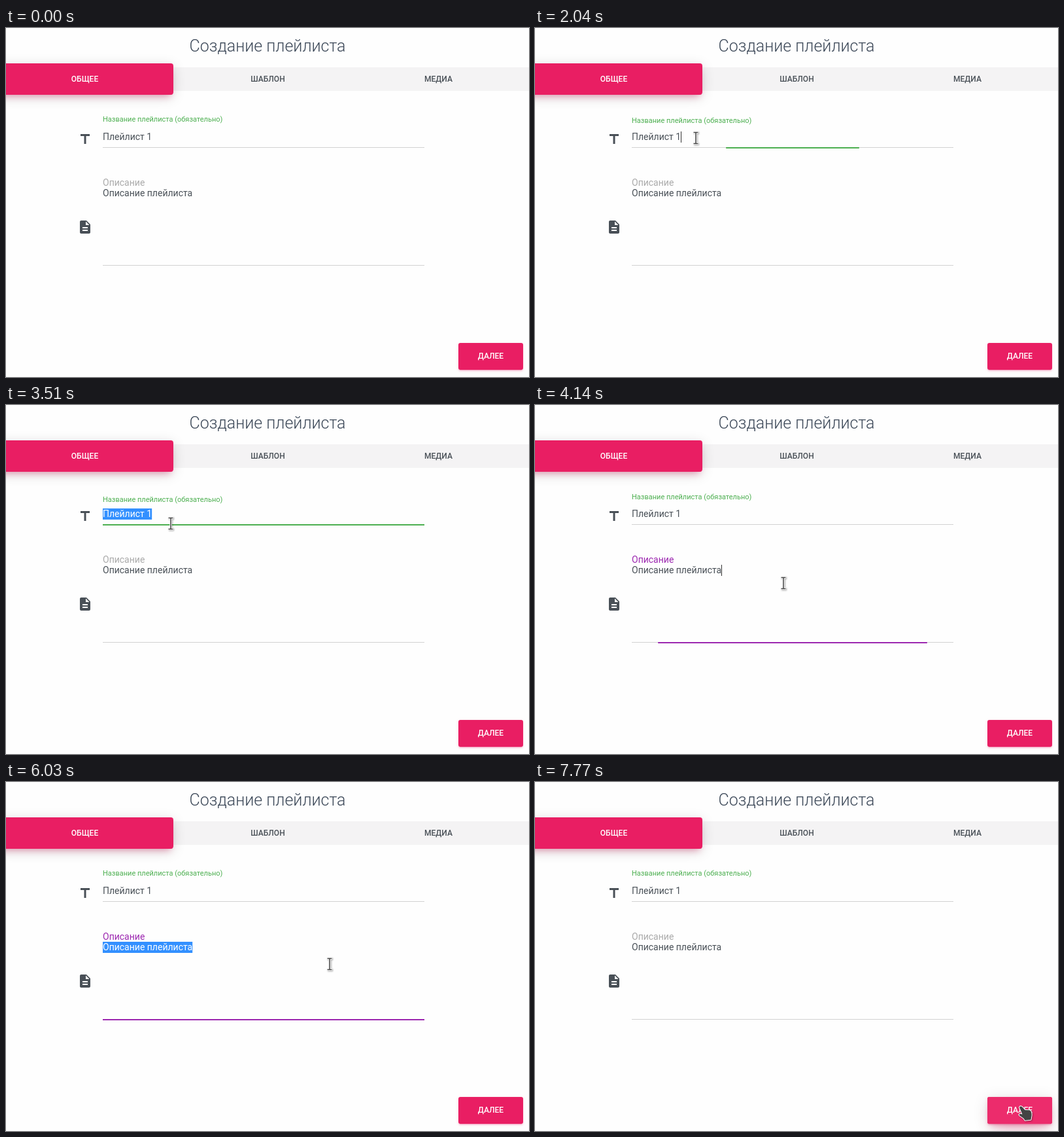
These frames come from a looping animation (800 px wide and 533 px high, 8000 ms). An HTML page:

```html
<!DOCTYPE html>
<html lang="ru">
<head>
<meta charset="utf-8">
<title>Создание плейлиста</title>
<style>
  html, body { margin: 0; width: 100%; height: 100%; overflow: hidden; background: #fefefe; }
  #stage { position: relative; width: 800px; height: 533px; overflow: hidden; }
  #stage > * { position: absolute; }
  .bar { left: 0; top: 60px; width: 800px; height: 36px; background: #f4f3f4; }
  .tab { left: -15px; top: 54px; width: 271px; height: 48px; border-radius: 4px; background: #e91e63;
    box-shadow: 0 4px 20px rgba(0,0,0,.14), 0 7px 10px -5px rgba(233,30,99,.4); }
  .button { left: 692px; top: 481px; width: 99px; height: 41px; border-radius: 3px; background: #e91e63;
    box-shadow: 0 2px 2px rgba(233,30,99,.14), 0 3px 1px -2px rgba(233,30,99,.2), 0 1px 5px rgba(233,30,99,.12); }
  #hover { background: #ec2c6c; opacity: 0;
    box-shadow: 0 14px 26px -12px rgba(233,30,99,.42), 0 4px 23px rgba(0,0,0,.12), 0 8px 10px -5px rgba(233,30,99,.2); }
  svg { left: 0; top: 0; font: 14px Roboto, sans-serif; fill: #495057; }
  .title { font-size: 25px; font-weight: 300; fill: #3c4858; }
  .caps { font-size: 12px; font-weight: 500; }
  .mid { text-anchor: middle; }
  .white { fill: #fff; }
  .line { fill: #d2d2d2; }
  .pointer { fill: #444; stroke: #fff; stroke-width: 2; stroke-linejoin: round; paint-order: stroke; }
  #cursor { filter: drop-shadow(1px 1px 1px rgba(0,0,0,.35)); }
</style>
</head>
<body>
<div id="stage">
  <div class="bar"></div>
  <div class="tab"></div>
  <div class="button"></div>
  <div class="button" id="hover"></div>
  <svg width="800" height="533">
    <text class="title mid" x="400" y="36">Создание плейлиста</text>
    <g class="caps mid">
      <text class="white" x="120.5" y="82">ОБЩЕЕ</text>
      <text x="400.5" y="82">ШАБЛОН</text>
      <text x="661.5" y="82">МЕДИА</text>
      <text class="white" x="741.5" y="505">ДАЛЕЕ</text>
    </g>
    <path transform="translate(109 158)" d="M5 4v3h5.5v12h3V7H19V4z"/>
    <path transform="translate(109 292)" d="M14 2H6c-1.1 0-2 .9-2 2v16c0 1.1.9 2 2 2h12c1.1 0 2-.9 2-2V8l-6-6zm2 16H8v-2h8v2zm0-4H8v-2h8v2zm-3-5V3.5L18.5 9H13z"/>
    <text id="nameLabel" x="148" y="143" font-size="11" fill="#4caf50">Название плейлиста (обязательно)</text>
    <text id="textLabel" x="148" y="241">Описание</text>
    <rect class="line" x="148" y="182" width="492" height="1"/>
    <rect class="line" x="148" y="362" width="492" height="1"/>
    <g id="fields"></g>
    <g id="cursor">
      <path id="arrow" class="pointer" d="M0 0V18L4 15 7 20 9.500 18.500 8 14 12 12z"/>
      <g id="beam" fill="none">
        <path d="M-4-8.5H4M-4 8.5H4M0-8.5V8.5" stroke="#fff" stroke-width="3.4"/>
        <path d="M-3.5-8.5H3.5M-3.5 8.5H3.5M0-8.5V8.5" stroke="#444" stroke-width="1.5"/>
      </g>
      <path id="hand" class="pointer" d="M-1 1q1-3 4-1l4.500 5 7 .2 2 1.500q1.500 3 1 7l-1 6-9 1-2-3-6.500-4.500q-1.500-2 1.500-2.500l3 .8z"/>
    </g>
  </svg>
</div>
<script>
const LOOP = 8000, STEP = 30, LEFT = 148, WIDTH = 492;
const ENTER = 630, NAME_FOCUS = 1957, TEXT_FOCUS = 3940, TEXT_BLUR = 6630, HOVER = 7540;
const $ = id => document.getElementById(id);
const clamp = v => Math.max(0, Math.min(1, v));
const smooth = f => f * f * (3 - 2 * f);
const easeOut = (t, start, length = 300) => 1 - (1 - clamp((t - start) / length)) ** 1.65;
const show = (el, on) => el.setAttribute('visibility', on ? 'visible' : 'hidden');
const setAttrs = (el, attrs) => { for (const k in attrs) el.setAttribute(k, attrs[k]); };

// Each move bends from the previous stop past `via` to `to`
const origin = [830, 22];
const moves = [
  { start: 540, end: 1650, via: [215, -80], to: [246, 168] },
  { start: 2100, end: 2730, via: [186, 168], to: [126, 171] },
  { start: 3240, end: 3900, via: [275, 150], to: [380, 272] },
  { start: 4240, end: 5130, via: [250, 258], to: [77, 255] },
  { start: 5340, end: 6450, via: [256, 290], to: [712, 272] },
  { start: 6960, end: 7770, via: [780, 440], to: [742, 496] }
];

function pointerAt(t) {
  let at = origin;
  for (const { start, end, via, to } of moves) {
    if (t < start) break;
    const f = smooth(clamp((t - start) / (end - start)) ** 0.85), g = 1 - f;
    at = at.map((from, i) => g * g * from + 2 * f * g * via[i] + f * f * to[i]);
  }
  return at;
}

function makeField(text, baseline, lineY, color, focus, dragEnd, blur) {
  const add = (tag, attrs, parent = $('fields')) => {
    const el = document.createElementNS('http://www.w3.org/2000/svg', tag);
    setAttrs(el, attrs);
    return parent.appendChild(el);
  };
  const clipId = 'clip' + baseline;
  const box = { y: baseline - 13, height: 17, width: 0 };
  const label = add('text', { x: LEFT, y: baseline });
  const selection = add('rect', { ...box, fill: '#3390ff' });
  const clip = add('rect', box, add('clipPath', { id: clipId }));
  const selected = add('text', { x: LEFT, y: baseline, class: 'white', 'clip-path': `url(#${clipId})` });
  label.textContent = selected.textContent = text;
  const caret = add('rect', { ...box, width: 1, fill: '#333' });
  const underline = add('rect', { y: lineY, height: 2, fill: color });

  return t => {
    const focused = t >= focus && t < blur;
    const size = focused ? WIDTH * easeOut(t, focus) : 0;
    setAttrs(underline, { x: LEFT + (WIDTH - size) / 2, width: size });
    const full = label.getComputedTextLength();
    const x = pointerAt(Math.min(t, dragEnd))[0];
    const count = Math.round(clamp((x - LEFT) / full) * text.length);
    const start = count ? label.getSubStringLength(0, count) : 0;
    const span = { x: LEFT + start, width: focused ? full - start : 0 };
    setAttrs(selection, span);
    setAttrs(clip, span);
    caret.setAttribute('x', Math.round(LEFT + full));
    show(caret, focused && count === text.length);
  };
}

const fields = [
  makeField('Плейлист 1', 171, 182, '#4caf50', NAME_FOCUS, 2730, TEXT_FOCUS),
  makeField('Описание плейлиста', 257, 362, '#9c27b0', TEXT_FOCUS, 5130, TEXT_BLUR)
];

const grey = [170, 170, 170], purple = [156, 39, 176];
const mix = f => `rgb(${grey.map((g, i) => Math.round(g + (purple[i] - g) * f))})`;

function draw(t) {
  fields.forEach(update => update(t));
  const drop = 5 * (easeOut(t, NAME_FOCUS) - easeOut(t, TEXT_FOCUS));
  $('nameLabel').setAttribute('y', 143 + Math.round(drop));
  const fade = smooth(clamp((t - TEXT_BLUR) / 310));
  $('textLabel').setAttribute('fill', mix(easeOut(t, TEXT_FOCUS, 200) - fade));
  $('hover').style.opacity = easeOut(t, HOVER, 180);

  const [x, y] = pointerAt(t);
  const overField = x >= LEFT && x <= LEFT + WIDTH && (y >= 148 && y <= 184 || y >= 243 && y <= 363);
  const overButton = x >= 692 && y >= 481;
  $('cursor').setAttribute('transform', `translate(${Math.round(x)} ${Math.round(y)})`);
  show($('arrow'), t >= ENTER && !overField && !overButton);
  show($('beam'), t >= ENTER && overField);
  show($('hand'), overButton);
}

function tick() {
  const t = performance.now() % LOOP;
  draw(Math.floor(t / STEP) * STEP);
  requestAnimationFrame(tick);
}
tick();
</script>
</body>
</html>
```
